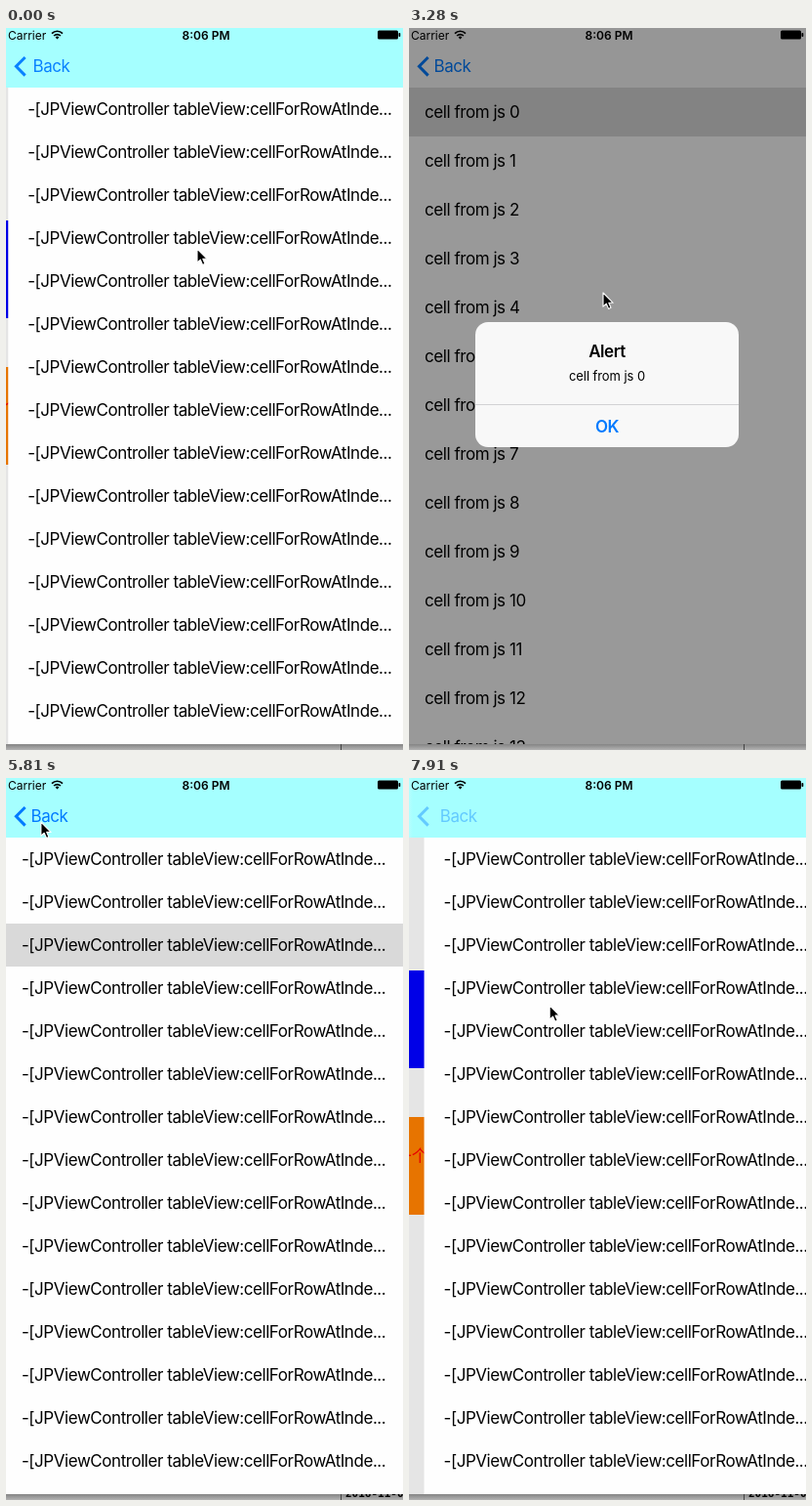
An HTML page for the animation above (8 s loop, 407x739 px).

```html
<!DOCTYPE html>
<html lang="zh-CN">
<head>
<meta charset="utf-8">
<title>Navigation demo</title>
<style>
  html, body { margin: 0; width: 100%; height: 100%; overflow: hidden; background: #fefefe; }
  svg { display: block; width: 407px; height: 739px; }
  text { font: 17px Inter, "Noto Sans CJK SC", "Noto Sans CJK", sans-serif; letter-spacing: -.45px; white-space: pre; }
  .cjk { letter-spacing: 0; }
  .bold { font-weight: 600; }
  .mid { text-anchor: middle; }
  .status { font-size: 12px; letter-spacing: 0; }
  .tint { fill: #007aff; }
  .log { font: bold 11px "DejaVu Sans Mono", monospace; letter-spacing: 0; }
</style>
</head>
<body>
<svg viewBox="0 0 407 739">
  <defs>
    <clipPath id="screen"><rect width="407" height="733"/></clipPath>
    <linearGradient id="shade" x2="0" y2="1">
      <stop stop-color="#848484"/><stop offset="1" stop-color="#b2b2b2"/>
    </linearGradient>
    <linearGradient id="bar" gradientUnits="userSpaceOnUse" y1="0" y2="0">
      <stop id="barLeft"/><stop id="barRight" offset="1"/>
    </linearGradient>
  </defs>

  <rect y="733" width="407" height="6" fill="url(#shade)"/>
  <rect x="343" y="733" width="1" height="6" fill="#444"/>
  <text id="log" class="log" x="348" y="736">2016-11-0</text>

  <g clip-path="url(#screen)">
    <g id="home">
      <rect width="414" height="733" fill="#fdfdfd"/>
      <rect x="50" y="197" width="314" height="100" fill="#00f"/>
      <text class="cjk mid" x="207" y="253" fill="#fff" style="font-size:18px">进入界面</text>
      <rect x="40" y="347" width="334" height="100" fill="#ff8000"/>
      <text class="cjk" x="40" y="393" fill="#f00">我修改了一个巨大的错误，我能够<tspan style="letter-spacing:-.45px">hotfix</tspan>，牛</text>
      <text class="cjk" x="40" y="413" fill="#f00">逼吧！</text>
    </g>
    <rect id="homeDim" width="407" height="733"/>
    <g id="list">
      <rect width="414" height="733" fill="#fefefe"/>
      <rect id="listPick" y="149" width="414" height="44" fill="#d9d9d9"/>
    </g>
    <rect id="listDim" width="407" height="733"/>
    <g id="cells">
      <rect width="414" height="733" fill="#fefefe"/>
      <rect id="cellPick" y="61" width="414" height="50" fill="#d9d9d9"/>
    </g>

    <rect width="407" height="61" fill="url(#bar)"/>
    <path id="chevron" d="M19.6 30 10.4 39.3 19.6 48.6" fill="none" stroke="#007aff" stroke-width="3"/>
    <text id="backHome" class="tint" y="45">Back</text>
    <text id="backList" class="tint" y="45">Back</text>

    <text class="status" x="2" y="11.5">Carrier</text>
    <path d="M47 5.6a7.6 7.6 0 0 1 11 0M49.1 8a4.8 4.8 0 0 1 6.8 0" fill="none" stroke="#000" stroke-width="1.7"/>
    <path d="M52.5 11.6l-1.9-2.1a2.7 2.7 0 0 1 3.8 0z"/>
    <text class="status bold mid" x="205" y="11.5">8:06 PM</text>
    <rect x="381" y="2.5" width="21" height="9" rx="1.5"/>
    <rect x="402.5" y="5" width="1.8" height="4" rx=".8"/>

    <rect id="dim" width="407" height="733"/>
    <g id="alert">
      <rect x="68" y="301" width="270" height="128" rx="13" fill="#f8f8f8"/>
      <rect x="68" y="385" width="270" height="1" fill="#d2d2d4"/>
      <text class="bold mid" x="203" y="337">Alert</text>
      <text class="mid" x="203" y="361" style="font-size:13px;letter-spacing:-.08px">cell from js 0</text>
      <text class="bold mid tint" x="203" y="414">OK</text>
    </g>
  </g>

  <path id="cursor" d="M0 0V14.2L3.3 11.2 5.6 16.4 8 15.3 5.8 10.3H10.2Z" stroke="#fff" stroke-width="1.1" stroke-linejoin="round"/>
</svg>
<script>
const LOOP = 8000;
const LEFT = -4, WIDTH = 414, PARALLAX = 124;
const CYAN = '#a5ffff', PALE = '#fafafa';

// Pointer moves in order; the last one leads back to the first.
const moves = [
  { from: 230, to: 900, x: 123, y: 166 },   // third row
  { from: 1890, to: 2400, x: 75, y: 70 },   // first cell
  { from: 2650, to: 3280, x: 199, y: 271 },
  { from: 3460, to: 3800, x: 203, y: 402 }, // OK
  { from: 3900, to: 4700, x: 33, y: 40 },   // Back
  { from: 4910, to: 5160, x: 55, y: 75 },
  { from: 5540, to: 6000, x: 32, y: 39 },   // Back
  { from: 6300, to: 6690, x: 143, y: 233 }, // blue button
  { from: 7910, to: 8000, x: 196, y: 226 }
];

const el = {};
document.querySelectorAll('[id]').forEach(n => el[n.id] = n);
const clamp = v => Math.max(0, Math.min(1, v));
const easeOut = k => 1 - (1 - k) ** 2;
const set = (n, attrs) => { for (const k in attrs) n.setAttribute(k, attrs[k]); };
const shift = (n, x, y = 0) => set(n, { transform: `translate(${x} ${y})` });

function addRows(parent, count, height, baseline, label) {
  for (let i = 0; i < count; i++) {
    const row = document.createElementNS('http://www.w3.org/2000/svg', 'text');
    set(row, { x: 20, y: baseline + i * height });
    row.textContent = label(i);
    parent.append(row);
  }
}
addRows(el.list, 15, 44, 89, () => '-[JPViewController tableView:cellForRowAtInde...');
addRows(el.cells, 14, 50, 92, i => 'cell from js ' + i);

// Critically damped slide, from 1 down to 0.
function settle(ms) {
  const x = Math.max(0, ms) * .015;
  const v = (1 + x) * Math.exp(-x);
  return v < .002 ? 0 : v;
}

// How far a pushed screen covers the one below, across the loop seam.
function visit(t, pushAt, popAt) {
  const age = (t - pushAt + LOOP) % LOOP;
  const stay = (popAt - pushAt + LOOP) % LOOP;
  const leaving = age > stay;
  return { leaving, cover: leaving ? settle(age - stay) : 1 - settle(age) };
}

function pointer(t) {
  let { x, y } = moves[moves.length - 1];
  for (const m of moves) {
    const k = easeOut(clamp((t - m.from) / (m.to - m.from)));
    x += (m.x - x) * k;
    y += (m.y - y) * k;
  }
  return [x, y];
}

function drawBar(list, cells) {
  const b = list.cover, c = cells.cover;
  const cover = c || b;
  const edge = cover ? LEFT + WIDTH * (1 - cover) : 999;
  const mid = edge - 26 * Math.max(0, 1 - edge / 100);
  const half = Math.min(32, (edge - LEFT) / 2 + .5);
  set(el.bar, { x1: mid - half, x2: mid + half });
  set(el.barLeft, { 'stop-color': c ? CYAN : PALE });
  set(el.barRight, { 'stop-color': c ? PALE : CYAN });

  const arrive = v => clamp(1.2 - 17 * (1 - v));
  set(el.chevron, { opacity: list.leaving ? clamp(2 * b - 1) : arrive(b) });
  set(el.backHome, {
    x: 25.5 + (c ? -72 * c : 134 * (1 - b)),
    opacity: c ? clamp(1 - 4 * c) : list.leaving ? b : arrive(b)
  });
  set(el.backList, {
    x: 25.5 + 174 * (1 - c),
    opacity: cells.leaving ? c * .8 : arrive(c)
  });
}

function drawAlert(t) {
  const shown = clamp((t - 2620) / 380);
  const a = shown * clamp((4230 - t) / 300);
  const scale = 1.15 - .15 * shown;
  set(el.dim, { opacity: .4 * a });
  set(el.alert, { opacity: a, transform: `translate(203 365) scale(${scale}) translate(-203 -365)` });
}

function draw(t) {
  const list = visit(t, 7590, 6040), cells = visit(t, 1293, 4910);
  const b = list.cover, c = cells.cover;

  shift(el.home, LEFT - PARALLAX * b);
  shift(el.list, LEFT + WIDTH * (1 - b) - PARALLAX * c);
  shift(el.cells, LEFT + WIDTH * (1 - c));
  set(el.homeDim, { opacity: .1 * b });
  set(el.listDim, { opacity: .1 * c });
  set(el.listPick, { opacity: +(t >= 1270 && t < 7500) });
  set(el.cellPick, { opacity: +(t >= 2570) });
  drawBar(list, cells);
  drawAlert(t);
  set(el.log, { opacity: +(t >= 3880) });
  shift(el.cursor, ...pointer(t));
}

const start = performance.now();
function tick() {
  draw((performance.now() - start) % LOOP);
  requestAnimationFrame(tick);
}
tick();
</script>
</body>
</html>
```
